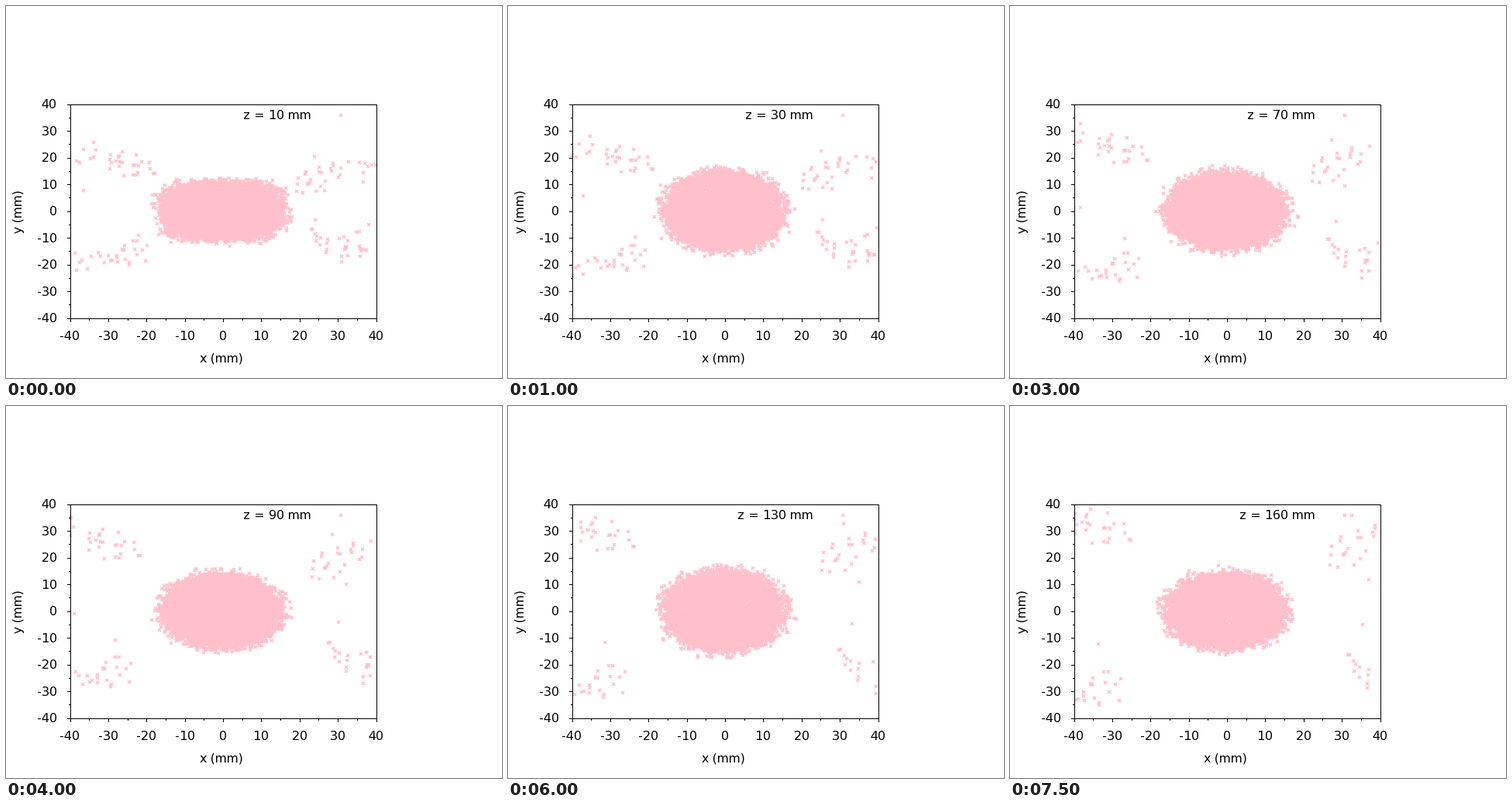
A matplotlib script for the animation above (8000 ms loop, 640 by 480 pixels).

```python
import numpy as np
import matplotlib.pyplot as plt
from matplotlib.animation import FuncAnimation

W, H, DPI = 640, 480, 100
PX = 72 / DPI  # points per pixel
LEFT, RIGHT, TOP, BOTTOM = 82.5, 477.5, 126.5, 402.5
LIMIT = 40  # mm
FRAMES, INTERVAL = 16, 500
Z0 = 10

plt.rcParams.update({"font.family": "DejaVu Sans", "font.size": 16 * PX,
                     "text.hinting_factor": 1})
rng = np.random.default_rng(7)


def to_px(x, y):
    return (np.interp(x, (-LIMIT, LIMIT), (LEFT, RIGHT)),
            np.interp(y, (-LIMIT, LIMIT), (BOTTOM, TOP)))


def beam(sx, sy, x0, y0, n=33):
    """Diverging particles of one corner: x, y in mm and mm per 10 mm of z."""
    x = rng.triangular(x0, x0 + 4, 46, n)
    y = y0 + 0.25 * (x - 27) + rng.normal(0, 3, n)
    vx = 0.2 + 0.0162 * x
    vy = 0.45 + 0.028 * y
    return np.array([sx * x, sy * y, sx * vx, sy * vy])


# Lone particles between the beams
LONE = np.array([(-36.5, 7.8, -0.3, -1.09), (-22, -9.2, -0.78, -0.2),
                 (24, -3.2, 0.76, -0.12), (26.5, 7.8, 0.71, 0.26)]).T
OUTER = np.hstack([LONE, beam(-1, 1, 17, 18), beam(1, 1, 17.5, 14.5),
                   beam(-1, -1, 17.5, 16.5), beam(1, -1, 21, 12)])

# Core: points on a 4D sphere, so each turn in phase space keeps the disc filled
N = 5500
phase = rng.normal(size=(4, N))
phase /= np.linalg.norm(phase, axis=0)
phase *= 1 - 0.3 * rng.random(N) ** 0.4


def core(z):
    a = 0.02 * z
    u, v = phase[:2] * np.cos(a) + phase[2:] * np.sin(a)
    squeeze = np.exp(-((z - Z0) / 12) ** 2)
    ry = 18.6 + 0.9 * np.cos(2 * np.pi * (z - 45) / 85) - 4 * squeeze
    boxy = 1 + 0.13 * squeeze * np.sin(2 * np.arctan2(v, u)) ** 2
    return 20 * u * boxy - 0.3, ry * v * boxy


def outer(z):
    x, y, vx, vy = OUTER
    t = (z - Z0) / 10
    return x + vx * t, y + vy * t


fig = plt.figure(figsize=(W / DPI, H / DPI), dpi=DPI, facecolor="white")
ax = fig.add_axes((0, 0, 1, 1))
ax.set_xlim(0, W)
ax.set_ylim(H, 0)
ax.axis("off")


def line(xs, ys):
    ax.plot(xs, ys, color="black", lw=PX, zorder=3,
            solid_capstyle="projecting")


line([LEFT, RIGHT, RIGHT, LEFT, LEFT], [TOP, TOP, BOTTOM, BOTTOM, TOP])
for v in range(-LIMIT, LIMIT + 1, 5):
    x, y = to_px(v, v)
    major = v % 10 == 0
    size = 4 if major else 2
    line([x, x], [BOTTOM, BOTTOM + size])
    line([LEFT - size, LEFT], [y, y])
    if major:
        ax.text(x, 431, str(v), ha="center", va="baseline")
        ax.text(66, y + 5.6, str(v), ha="right", va="baseline")
ax.text(278, 459, "x (mm)", ha="center", va="baseline")
ax.text(16, 265, "y (mm)", ha="center", va="center", rotation=90)

label = ax.text(394, 146, "", ha="right", va="baseline", zorder=4)
dots, = ax.plot([], [], ls="none", marker="x", color="pink",
                ms=5 * PX, mew=1.6 * PX, zorder=2)


def update(i):
    z = Z0 * (i + 1)
    x, y = np.hstack([core(z), outer(z)])
    inside = (np.abs(x) <= LIMIT) & (np.abs(y) <= LIMIT)
    x, y = to_px(x[inside], y[inside])
    dots.set_data(np.append(x, 431.5), np.append(y, 140.5))
    label.set_text(f"z = {z} mm")
    return dots, label


anim = FuncAnimation(fig, update, frames=FRAMES, interval=INTERVAL,
                     repeat=True, repeat_delay=0)
plt.show()
```
